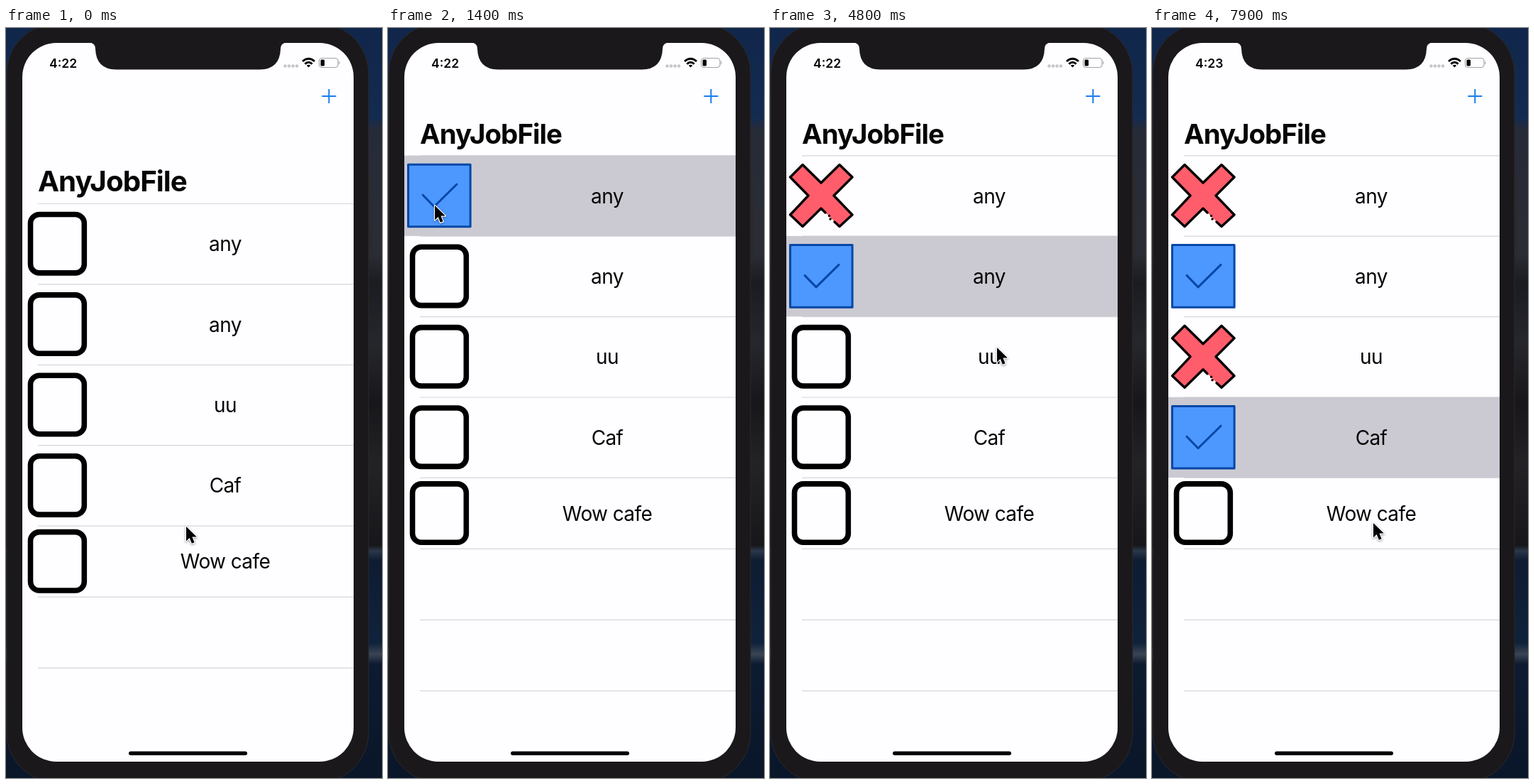
Animation, 530 px wide and 1056 px high, one loop 8 s. Source, as an HTML page:

```html
<!DOCTYPE html>
<html lang="en">
<head>
<meta charset="utf-8">
<title>Checklist</title>
<style>
html, body { margin: 0; width: 100%; height: 100%; overflow: hidden; background: #10151f; }
svg { display: block; width: 530px; height: 1056px; }
text { font-family: Inter, Roboto, sans-serif; fill: #050505; }
.title { font-size: 38.4px; font-weight: 700; letter-spacing: -.9px; }
.item { font-size: 28px; letter-spacing: -.6px; text-anchor: middle; }
.clock { font-size: 17.5px; font-weight: 600; }
.line { stroke: #d6d5d9; stroke-width: 1.2; }
</style>
</head>
<body>
<svg viewBox="0 0 530 1056">
  <defs>
    <linearGradient id="backdrop" x2="0" y2="1">
      <stop offset="0" stop-color="#10264a"/>
      <stop offset=".12" stop-color="#142b50"/>
      <stop offset=".135" stop-color="#262b38"/>
      <stop offset=".3" stop-color="#2b2d34"/>
      <stop offset=".34" stop-color="#1b1c21"/>
      <stop offset=".42" stop-color="#26272c"/>
      <stop offset=".5" stop-color="#17171b"/>
      <stop offset=".58" stop-color="#232225"/>
      <stop offset=".69" stop-color="#17171b"/>
      <stop offset=".697" stop-color="#2b384a"/>
      <stop offset=".71" stop-color="#0e1c32"/>
      <stop offset=".82" stop-color="#10223b"/>
      <stop offset=".835" stop-color="#3a4554"/>
      <stop offset=".848" stop-color="#0d1b31"/>
      <stop offset="1" stop-color="#0a1629"/>
    </linearGradient>
    <g id="empty">
      <rect x="34.500" y="-41.200" width="75.800" height="82.400" rx="12.500" fill="none" stroke="#000" stroke-width="7.600"/>
    </g>
    <g id="check" stroke="#0747a6" stroke-width="3" stroke-linejoin="round" stroke-linecap="round">
      <rect x="28.500" y="-43.800" width="87.600" height="87.600" fill="#4d98ff"/>
      <path d="M49-1L65 15.500 97-16" fill="none"/>
    </g>
    <g id="cross" stroke="#000" stroke-width="3.400" stroke-linejoin="round" stroke-linecap="round">
      <path d="M46-43.500L72-18 98-43.500 116-26 90 0 116 27 98 43.500 72 18 46 43.500 28.500 27 54 0 28.500-26Z" fill="#ff5d6b" stroke="none"/>
      <path d="M91 37L98 43.500 116 27 90 0 116-26 98-43.500 72-18 46-43.500 28.500-26 54 0 28.500 27 46 43.500 72 18 78 24M83.500 28.500h.1M85 33h.1" fill="none"/>
    </g>
  </defs>

  <rect width="530" height="1056" fill="url(#backdrop)"/>
  <rect x="508" y="207" width="7.500" height="111" rx="2" fill="#2b2a2e"/>
  <rect x="1" y="-6" width="510" height="1068" rx="70" fill="#1a181b" stroke="#2b292d"/>
  <rect x="23" y="21" width="467" height="1012" rx="48" fill="#fefdff"/>
  <path d="M118 20.500q8 1 8 9 1 28.500 29 29H358q28-.5 29-29 0-8 8-9Z" fill="#1a181b"/>

  <text class="clock" id="clock" x="61" y="55.500">4:22</text>
  <g fill="#c6c5c9">
    <circle cx="393.500" cy="53.500" r="2.300"/><circle cx="399" cy="53.500" r="2.300"/>
    <circle cx="404.500" cy="53.500" r="2.300"/><circle cx="410" cy="53.500" r="2.300"/>
  </g>
  <g fill="none" stroke="#050505" stroke-width="2.800">
    <path d="M418 47q8.500-7.500 17 0M421.300 50.600q5.200-4.600 10.400 0"/>
    <path d="M423.700 52.800q2.800-2.300 5.600 0l-2.800 2.800Z" fill="#050505" stroke="none"/>
  </g>
  <rect x="441.500" y="42.500" width="26.500" height="13" rx="4" fill="none" stroke="#a3a2a6" stroke-width="1.200"/>
  <rect x="443.500" y="44.500" width="5.500" height="9" rx="1.500"/>
  <path d="M469.300 46.500q2.600 2.500 0 5Z" fill="#a3a2a6"/>
  <path d="M455.300 86v20M445.300 96h20" stroke="#1a7df0" stroke-width="2"/>

  <g id="list">
    <g id="title"><text class="title" x="45" y="0">AnyJobFile</text></g>
    <g id="lines"></g>
    <rect id="glow" x="23" width="467" height="113.400" fill="#cbcad2"/>
    <g id="rows"></g>
  </g>

  <rect x="173" y="1018.500" width="167" height="5.500" rx="2.750"/>
  <path id="cursor" d="M0 0V20.500l4.700-4.500 3.200 7.800 3.700-1.500-3.200-7.700h6.400Z" stroke="#fff" stroke-width="2.400"
    stroke-linejoin="round" style="paint-order:stroke;filter:drop-shadow(0 1.500px 1.500px #0006)"/>
</svg>
<script>
const LOOP = 8000, STEP = 100, TOP = 179.5, ROW = 113.4;
const $ = id => document.getElementById(id);
const add = (parent, tag, attrs) => {
  const el = document.createElementNS('http://www.w3.org/2000/svg', tag);
  for (const k in attrs) el.setAttribute(k, attrs[k]);
  return parent.appendChild(el);
};

// Each item lists the moments at which its icon changes.
const items = [
  ['any', [1400, 'check'], [3000, 'cross']],
  ['any', [4000, 'check']],
  ['uu', [4900, 'cross']],
  ['Caf', [6400, 'check']],
  ['Wow cafe']
];
const selections = [[1000, 0], [4000, 1], [4900, 2], [6400, 3]];
const path = [
  [100, 254, 702], [700, 66, 248], [1000, 66, 250], [2000, 66, 250], [2800, 280, 255],
  [3000, 280, 255], [3300, 286, 366], [3500, 287, 371], [4000, 287, 371], [4300, 310, 416],
  [4800, 320, 450], [5400, 322, 453], [5700, 337, 487], [5900, 337, 487], [6200, 334, 577],
  [7300, 334, 577], [7900, 312, 697]
];

const icons = items.map(([label], i) => {
  const y = TOP + ROW * i + (i < 4 ? 56.5 : 50);
  add($('rows'), 'text', { class: 'item', x: 309, y: y + 10.5 }).textContent = label;
  return add($('rows'), 'use', { y });
});
const lines = Array.from({ length: 8 }, (_, i) => {
  const y = TOP + .3 + ROW * Math.min(i, 4) + 100 * Math.max(0, i - 4);
  return add($('lines'), 'line', { class: 'line', x1: 45, x2: 490, y1: y, y2: y });
});

const latest = (events, t, initial) =>
  events.reduce((value, [at, next]) => t >= at ? next : value, initial);

function pointer(t) {
  const i = path.findIndex(p => p[0] > t);
  if (i < 0) return path[path.length - 1].slice(1);
  if (!i) return path[0].slice(1);
  const [a, b] = [path[i - 1], path[i]];
  const p = (t - a[0]) / (b[0] - a[0]), ease = p * p * (3 - 2 * p);
  return [1, 2].map(k => a[k] + (b[k] - a[k]) * ease);
}

// Critically damped return of the pulled-down list.
function pull(t) {
  if (t >= 700) return 0;
  const s = Math.max(0, t - 50) * .011;
  return 67.7 * (1 + s) * Math.exp(-s);
}

function draw(now) {
  const t = Math.floor(now % LOOP / STEP) * STEP;
  const offset = pull(t), selected = latest(selections, t, -1);
  $('list').setAttribute('transform', `translate(0 ${offset})`);
  $('title').setAttribute('transform',
    `translate(45 162.500) scale(${1 + offset * .00073}) translate(-45 0)`);
  lines[7].setAttribute('visibility', offset > 31 ? 'hidden' : 'visible');
  $('glow').setAttribute('visibility', selected < 0 ? 'hidden' : 'visible');
  $('glow').setAttribute('y', TOP + ROW * Math.max(0, selected));
  icons.forEach((icon, i) =>
    icon.setAttribute('href', '#' + latest(items[i].slice(1), t, 'empty')));
  $('clock').textContent = t < 7300 ? '4:22' : '4:23';
  $('cursor').setAttribute('transform', `translate(${pointer(t)})`);
}

let start;
function tick(now) {
  start ??= now;
  draw(now - start);
  requestAnimationFrame(tick);
}
draw(0);
requestAnimationFrame(tick);
</script>
</body>
</html>
```
